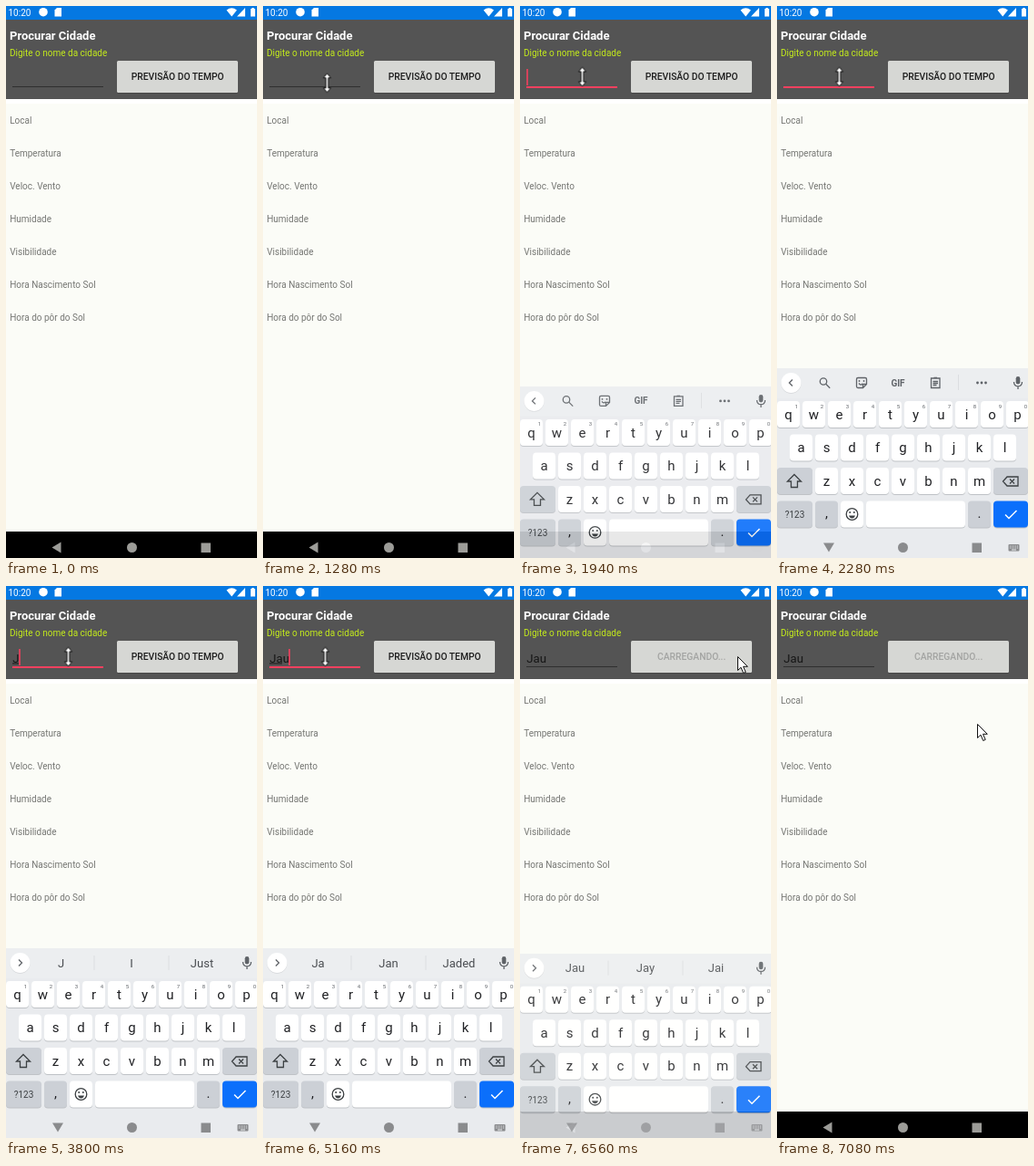
An HTML page for the animation above (8 s loop, 276 by 605 pixels).

```html
<!DOCTYPE html>
<html lang="pt">
<head>
<meta charset="utf-8">
<title>Previsão do tempo</title>
<style>
html, body { margin: 0; width: 100%; height: 100%; overflow: hidden; background: #fbfcf7; }
svg { display: block; }
text { font: 10px Roboto, sans-serif; }
.mid { text-anchor: middle; }
.line { fill: none; stroke: #5f6368; stroke-width: 1.3; }
.button-text { font-size: 10.3px; font-weight: 500; }
.key { font-size: 15px; fill: #202124; }
.hint { font-size: 6px; fill: #5f6368; }
.word { font-size: 13px; fill: #4a4d51; }

/* Hard changes: one loop is 8 s, so 1% is 80 ms */
.cut { animation: 8s step-end infinite; }
.move { animation: 8s linear infinite; }

#pointer { animation-name: pointer; }
@keyframes pointer {
  0%, 3.875% { transform: translate(242px, 539px); }
  13.875%, 14.375% { transform: translate(84px, 99px); }
  16%, 20.125% { transform: translate(70.5px, 84.3px); }
  21.75%, 66.75% { transform: translate(68.5px, 77.5px); }
  67.5%, 72.5% { transform: translate(70px, 77.5px); }
  75.625%, 83.25% { transform: translate(239px, 77px); }
  88.5%, 100% { transform: translate(220px, 151px); }
}
#arrow { animation-name: arrow; }
@keyframes arrow {
  0%, 15.1% { visibility: hidden; }
  3.875%, 73.25% { visibility: visible; }
}
#resize { animation-name: resize; }
@keyframes resize {
  0%, 73.25% { visibility: hidden; }
  15.1% { visibility: visible; }
}

#keyboard { animation-name: slide, fade; }
@keyframes slide {
  0%, 21.96% { transform: translateY(208px); animation-timing-function: cubic-bezier(.4, 0, .2, 1); }
  25.56%, 81.5% { transform: none; animation-timing-function: cubic-bezier(.4, 0, .2, 1); }
  86.5%, 100% { transform: translateY(208px); }
}
@keyframes fade {
  0%, 21.75% { opacity: 0; }
  24.5%, 81.5% { opacity: 1; }
  85.5%, 100% { opacity: 0; }
}
#nav-dark { animation-name: nav; }
@keyframes nav {
  0%, 24.25% { opacity: 0; }
  26.75%, 81.5% { opacity: 1; }
  83.5%, 100% { opacity: 0; }
}

#focus { animation-name: focus; }
@keyframes focus {
  0%, 76% { visibility: hidden; }
  21% { visibility: visible; }
}
#caret { animation-name: blink, advance; }
@keyframes blink {
  0%, 28.5%, 40%, 53.375%, 63.5%, 73.25% { visibility: hidden; }
  21%, 34.25%, 44.5%, 54.25%, 64.5% { visibility: visible; }
}
@keyframes advance {
  0% { transform: none; }
  44.5% { transform: translateX(7px); }
  54.25% { transform: translateX(14px); }
  64.5% { transform: translateX(21px); }
}
#compose { transform-box: fill-box; transform-origin: 0 0; animation-name: compose; }
@keyframes compose {
  0%, 82% { transform: scaleX(0); }
  47.5% { transform: scaleX(7); }
  56.625% { transform: scaleX(14); }
  66.75% { transform: scaleX(21.5); }
}
#c1 { animation-name: c1; }
#c2 { animation-name: c2; }
#c3 { animation-name: c3; }
@keyframes c1 { 0% { visibility: hidden; } 44.5% { visibility: visible; } }
@keyframes c2 { 0% { visibility: hidden; } 54.25% { visibility: visible; } }
@keyframes c3 { 0% { visibility: hidden; } 64.5% { visibility: visible; } }

#tools { animation-name: tools; }
#bar { animation-name: c1; }
#words1 { animation-name: words1; }
#words2 { animation-name: words2; }
#words3 { animation-name: words3; }
@keyframes tools { 0% { visibility: visible; } 44.5% { visibility: hidden; } }
@keyframes words1 { 0%, 56.625% { visibility: hidden; } 47.5% { visibility: visible; } }
@keyframes words2 { 0%, 66.75% { visibility: hidden; } 56.625% { visibility: visible; } }
@keyframes words3 { 0% { visibility: hidden; } 66.75% { visibility: visible; } }
#shift { animation-name: shift; }
@keyframes shift { 0%, 45% { fill: transparent; } 44.5% { fill: #3c4043; } }

#button { animation-name: press; }
@keyframes press {
  0%, 75.6% { fill: #d6d7d4; }
  76.5%, 77.5% { fill: #b1b2af; }
  79%, 100% { fill: #d6d7d4; }
}
#ready { animation-name: ready; }
#loading { animation-name: loading; }
@keyframes ready { 0% { visibility: visible; } 78.125% { visibility: hidden; } }
@keyframes loading { 0% { visibility: hidden; } 78.125% { visibility: visible; } }
</style>
</head>
<body>
<svg width="276" height="605" viewBox="0 0 276 605">
  <rect width="276" height="605" fill="#fbfcf7"/>
  <rect y="102" width="276" height="5" fill="#fff"/>

  <!-- Status bar -->
  <rect width="276" height="15" fill="#0578e2"/>
  <g fill="#fff">
    <text x="2.5" y="10.5">10:20</text>
    <circle cx="41" cy="6.7" r="4.8"/>
    <path d="M56 2h5v9.5h-7.5V4.5z"/>
    <path d="M242.5 4.5q5.700-4.500 11.400 0L248.200 11.500z"/>
    <path d="M263 2v9.500h-9z"/>
    <path d="M269 3h1.300V2h2.400v1h1.300v8.500h-5z"/>
  </g>

  <!-- Header -->
  <rect y="15" width="276" height="87" fill="#545454"/>
  <text x="4" y="36.500" fill="#fff" style="font-size:13px;font-weight:700">Procurar Cidade</text>
  <text x="4" y="55" fill="#c3ea1c">Digite o nome da cidade</text>
  <rect x="7" y="88" width="100" height="1" fill="#2f2f2f"/>
  <rect id="focus" class="cut" x="7" y="88" width="100" height="2" fill="#f5405f"/>
  <text x="7.300" y="83.500" fill="#161616" style="font-size:13.200px"><tspan id="c1" class="cut">J</tspan><tspan id="c2" class="cut">a</tspan><tspan id="c3" class="cut">u</tspan></text>
  <rect id="compose" class="cut" x="7" y="84.500" width="1" height="1" fill="#161616"/>
  <rect id="caret" class="cut" x="7.200" y="69" width="1.600" height="18" fill="#f5405f"/>

  <rect x="122" y="60.500" width="133" height="35" rx="1.500" fill="#3d3d3d"/>
  <rect id="button" class="move" x="122" y="60" width="133" height="35" rx="1.500" fill="#d6d7d4"/>
  <text id="ready" class="cut mid button-text" x="188.700" y="81" fill="#1d1d1d">PREVISÃO DO TEMPO</text>
  <text id="loading" class="cut mid button-text" x="188.700" y="81" fill="#a3a4a2">CARREGANDO...</text>

  <g id="labels" fill="#757673"></g>

  <!-- Navigation bar -->
  <rect y="576" width="276" height="29" fill="#000"/>
  <g fill="#9c9c98">
    <path d="M50.500 593.500l10-6v12z"/>
    <circle cx="138.500" cy="593.500" r="5.500"/>
    <rect x="214.500" y="588.500" width="10.500" height="10.500"/>
  </g>

  <g id="keyboard" class="move">
    <rect y="397" width="276" height="208" fill="#e9ebee"/>
    <rect y="397" width="276" height="33" fill="#eceef0"/>
    <circle cx="15.500" cy="413.700" r="11" fill="#d3d5d8"/>
    <circle cx="15.500" cy="413" r="11" fill="#fff"/>
    <g stroke="#5f6368" fill="none" stroke-width="1.300">
      <rect x="262.700" y="406" width="4.600" height="8.500" rx="2.300" fill="#5f6368" stroke="none"/>
      <path d="M260.500 412q0 4.800 4.500 4.800t4.500-4.800M265 417v3"/>
    </g>

    <g id="tools" class="cut">
      <path class="line" d="M17 409.500l-3.500 3.500 3.500 3.500"/>
      <circle class="line" cx="51" cy="411.500" r="3.700"/>
      <path class="line" d="M53.700 414.200l4.500 4.500"/>
      <path class="line" d="M89 407.500h8q1.500 0 1.500 1.500v5.500l-4 4H89q-1.500 0-1.500-1.500v-8q0-1.500 1.500-1.500zM94.500 418v-3.500h4M90 413.500q2 2.800 4 .5"/>
      <circle cx="90.500" cy="411" r=".9" fill="#5f6368"/>
      <circle cx="95.500" cy="411" r=".9" fill="#5f6368"/>
      <text class="mid" x="133" y="416.500" fill="#5f6368" style="font-weight:700">GIF</text>
      <path class="line" d="M169.500 408h9.500v10.500h-9.500zM171.500 411.500h5.500M171.500 413.500h5.500M171.500 415.500h4M172.500 407.500h3.500"/>
      <path d="M199.500 404v17" stroke="#dcdee1"/>
      <g fill="#5f6368">
        <circle cx="220.500" cy="413" r="1.400"/><circle cx="225" cy="413" r="1.400"/><circle cx="229.500" cy="413" r="1.400"/>
      </g>
    </g>

    <g id="bar" class="cut">
      <path class="line" d="M14 409.500l3.500 3.500-3.500 3.500"/>
      <path d="M97 405v16M179 405v16" stroke="#dcdee1"/>
    </g>
    <g id="words1" class="cut"></g>
    <g id="words2" class="cut"></g>
    <g id="words3" class="cut"></g>

    <g id="keys"></g>
    <path id="shift" class="cut" d="M19 513.500l7.500 7.500h-4v6.500h-7V521h-4z" fill="transparent" stroke="#3c4043" stroke-width="1.300"/>
    <path class="line" d="M253 516h12v10h-12l-4.500-5zM256 518.500l5 5M261 518.500l-5 5" style="stroke:#3c4043"/>
    <circle class="line" cx="82.500" cy="557" r="6.300" style="stroke:#3c4043"/>
    <path d="M79 558.500h7q-1 3-3.500 3t-3.500-3z" fill="#3c4043"/>
    <circle cx="80.200" cy="555" r="1" fill="#3c4043"/>
    <circle cx="84.800" cy="555" r="1" fill="#3c4043"/>
    <path d="M251 557.500l4 4 8.500-8.500" fill="none" stroke="#fff" stroke-width="1.500"/>
  </g>

  <g id="nav-dark" class="move" fill="#8a8b8d">
    <path d="M51 588.500h12l-6 10z"/>
    <circle cx="138.500" cy="593.500" r="5.500"/>
    <rect x="214.500" y="588.500" width="10.500" height="10.500"/>
    <rect x="254.500" y="590" width="12" height="7.500" rx="1"/>
    <path d="M256 592h9M256 594h9" stroke="#e9ebee" stroke-dasharray="1 1"/>
    <path d="M258 596h5" stroke="#e9ebee"/>
  </g>

  <g id="pointer" class="move" stroke="#111" fill="#fff">
    <path id="arrow" class="cut" d="M.5.5V15.500L4 12.200l2.700 6.300 2.500-1.100L6.500 11.300h4.800z"/>
    <path id="resize" class="cut" d="M0-10.500l4 5H1.300v11H4l-4 5-4-5h2.700v-11H-4z"/>
  </g>
</svg>
<script>
const $ = id => document.getElementById(id);

function add(parent, tag, attrs, text = '') {
  const el = document.createElementNS('http://www.w3.org/2000/svg', tag);
  for (const name in attrs) el.setAttribute(name, attrs[name]);
  el.textContent = text;
  parent.append(el);
}

['Local', 'Temperatura', 'Veloc. Vento', 'Humidade', 'Visibilidade', 'Hora Nascimento Sol', 'Hora do pôr do Sol']
  .forEach((label, i) => add($('labels'), 'text', { x: 4.2, y: 129 + 36 * i }, label));

[['J', 'I', 'Just'], ['Ja', 'Jan', 'Jaded'], ['Jau', 'Jay', 'Jai']].forEach((set, n) =>
  set.forEach((word, i) =>
    add($('words' + (n + 1)), 'text', { class: 'word mid', x: 60.5 + 77.5 * i, y: 417.5 }, word)));

// A key cap centred on x, y
function cap(x, y, width = 25, fill = '#fff') {
  const box = { x: x - width / 2, width, height: 29, rx: 4 };
  add($('keys'), 'rect', { ...box, y: y - 14, fill: '#bfc2c6' });
  add($('keys'), 'rect', { ...box, y: y - 15, fill });
}
const letter = (x, y, char) => add($('keys'), 'text', { class: 'key mid', x, y }, char);

[['qwertyuiop', 12.5, 448], ['asdfghjkl', 26.5, 484.5], ['zxcvbnm', 54.5, 521]].forEach(([row, start, y], r) =>
  [...row].forEach((char, i) => {
    const x = start + 28 * i;
    cap(x, y);
    letter(x, y + 4.7, char);
    if (r === 0) add($('keys'), 'text', { class: 'hint mid', x: x + 9, y: 440.5 }, (i + 1) % 10);
  }));

const grey = '#ccd0d6';
cap(19.5, 521, 39, grey);
cap(257, 521, 38, grey);
cap(19.5, 557.5, 39, grey);
cap(54.5, 557.5, 25, grey);
cap(82.5, 557.5);
cap(152.5, 557.5, 109);
cap(222.5, 557.5, 25, grey);
cap(257, 557.5, 38, '#0b6ffb');
add($('keys'), 'text', { class: 'mid', x: 19.5, y: 561, fill: '#3c4043' }, '?123');
letter(54.5, 561, ',');
letter(222.5, 561, '.');
</script>
</body>
</html>
```
